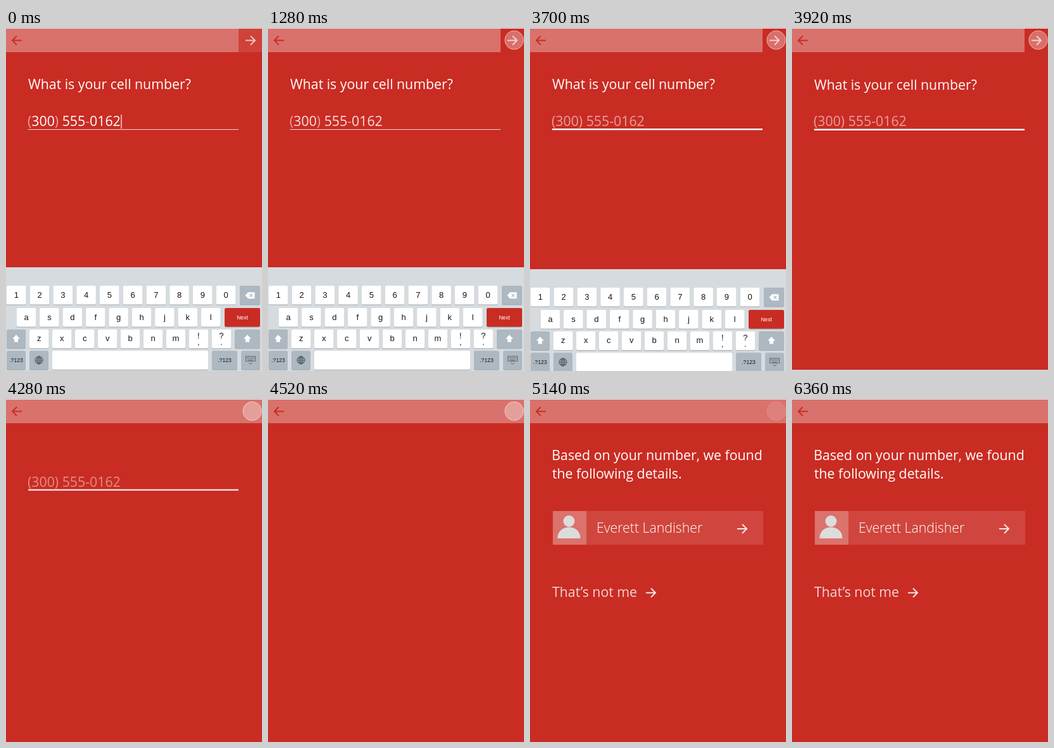
These frames come from a looping animation (404 px wide and 539 px high, 6.38 s). An HTML page:

```html
<!DOCTYPE html>
<html lang="en">
<head>
<meta charset="utf-8">
<title>Sign-up step</title>
<style>
  html, body { margin: 0; width: 100%; height: 100%; overflow: hidden; background: #c92c23; }
  svg { display: block; width: 100%; height: 100%; }
  text { white-space: pre; }
  .copy { font: 400 21.3px "Open Sans", sans-serif; fill: #fff; }
  .light { font-weight: 300; }
  .key { font: 13px "Liberation Sans", Arial, sans-serif; fill: #161616; text-anchor: middle; }
  .small { font-size: 8.6px; }
  .arrow { fill: none; stroke-width: 2; }
</style>
</head>
<body>
<svg viewBox="0 0 404 539" xmlns="http://www.w3.org/2000/svg">
  <defs>
    <path id="arrow" class="arrow" d="M0 0H15M8 -7L15 0L8 7"/>
  </defs>
  <rect width="404" height="539" fill="#c92c23"/>

  <g id="question">
    <text class="copy" x="35" y="96">What is your cell number?</text>
  </g>
  <g id="field">
    <text class="copy" x="34" y="154"><tspan fill-opacity=".55">(</tspan><tspan class="digits">300</tspan><tspan fill-opacity=".55">) </tspan><tspan class="digits">555</tspan><tspan fill-opacity=".55">-</tspan><tspan class="digits">0162</tspan></text>
    <rect id="caret" x="181.4" y="136" width="1.2" height="22" fill="#fff"/>
    <rect x="35" y="159" width="332" height="1" fill="#fff" fill-opacity=".8"/>
    <rect id="progress" x="35" y="158" width="0" height="2.4" fill="#fff"/>
  </g>

  <g id="answer">
    <text class="copy" x="34.3" y="96">Based on your number, we found</text>
    <text class="copy" x="35" y="125">the following details.</text>
  </g>
  <g id="card">
    <rect x="36" y="176" width="332" height="53" fill="#fff" fill-opacity=".12"/>
    <rect x="36" y="176" width="53" height="53" fill="#fff" fill-opacity=".24"/>
    <circle cx="61.5" cy="192" r="9" fill="#dcdcdc"/>
    <path d="M43.5 219C43.5 208 51 201.5 61.5 201.5S79.5 208 79.5 219Z" fill="#dcdcdc"/>
    <text class="copy light" x="105" y="210">Everett Landisher</text>
    <use href="#arrow" x="327" y="204" stroke="#fff" stroke-opacity=".85"/>
  </g>
  <g id="reject">
    <text class="copy" x="35" y="311" fill-opacity=".8">That’s not me</text>
    <use href="#arrow" x="183" y="304.5" stroke="#fff" stroke-opacity=".88"/>
  </g>

  <g id="keyboard"></g>

  <rect y="1" width="404" height="37" fill="#d9726c"/>
  <rect width="404" height="1" fill="#f0dedd"/>
  <use href="#arrow" transform="translate(25 19.5) scale(-1 1)" stroke="#c92c23"/>
  <g id="next">
    <rect x="367" y="1" width="37" height="37" fill="#c92c23"/>
    <rect id="glow" x="367" y="1" width="37" height="37" fill="#fff"/>
    <use href="#arrow" x="378" y="19.5" stroke="#fff" stroke-opacity=".68"/>
  </g>
  <circle id="touch" cx="388.5" cy="19" r="14.7" fill="#fff" fill-opacity=".32" stroke="#fff" stroke-opacity=".5"/>
</svg>
<script>
const LOOP = 6380;
const $ = id => document.getElementById(id);
const digits = document.querySelectorAll(".digits");

const part = (t, from, to) => Math.min(1, Math.max(0, (t - from) / (to - from)));
const sine = p => (1 - Math.cos(Math.PI * p)) / 2;
const inOutCubic = p => p < .5 ? 4 * p ** 3 : 1 - 4 * (1 - p) ** 3;
const pullBack = p => 1.6 * p ** 3 - .6 * p ** 2;

// Ease with control points (.4, 0) and (.2, 1), solved by bisection.
function standard(x) {
  let low = 0, high = 1;
  for (let i = 0; i < 24; i++) {
    const s = (low + high) / 2, r = 1 - s;
    if (1.2 * r * r * s + .6 * r * s * s + s ** 3 < x) low = s; else high = s;
  }
  return 3 * low * low - 2 * low ** 3;
}

function place(id, y, opacity) {
  $(id).setAttribute("transform", `translate(0 ${y.toFixed(3)})`);
  $(id).setAttribute("opacity", opacity);
}

function buildKeyboard() {
  const GREY = "#adb8c0", RED = "#c92c23";
  let out = '<rect y="376" width="404" height="163" fill="#d6dbdf"/>';

  const cap = (x, y, w, fill = "#fff") => {
    out += `<rect x="${x}" y="${y + 1}" width="${w}" height="29.5" rx="2.5" fill="#a2a9ae"/>` +
      `<rect x="${x}" y="${y}" width="${w}" height="29.5" rx="2.5" fill="${fill}"/>`;
  };
  const label = (x, y, s, extra = "") => {
    out += `<text class="key ${extra}" x="${x}" y="${y}">${s}</text>`;
  };
  const row = (keys, x, y, step) => [...keys].forEach((k, i) => {
    const left = x + i * step;
    cap(left, y, 30.6);
    label(left + 15.3, y + 18.5, k);
  });
  const shift = x => {
    out += `<path d="M${x} 482l6 6.5h-3v5h-6v-5h-3z" fill="#fff"/>`;
  };

  row("1234567890", 1, 405, 36.75);
  row("asdfghjkl", 16.7, 440, 36.4);
  row("zxcvbnm", 37, 473.7, 35.95);

  [["!", ",", 288.6], ["?", ".", 324.6]].forEach(([top, low, x]) => {
    cap(x, 473.7, 30.6);
    label(x + 15.3, 488, top);
    label(x + 15.3, 498, low);
  });

  cap(369, 405, 32, GREY);
  out += '<path d="M377.5 420.3l4.5-5h10.5v10H382z" fill="#fff"/>' +
    `<path d="M384.5 418l4.5 4.6m0-4.6l-4.5 4.6" stroke="${GREY}" stroke-width="1.2"/>`;
  cap(345, 440, 56, RED);
  out += '<text class="key small" x="373" y="457.5" style="fill:#fff">Next</text>';
  cap(1, 473.7, 30, GREY);
  shift(16);
  cap(361, 473.7, 40, GREY);
  shift(381);

  cap(1, 507.3, 30, GREY);
  label(16, 525, ".?123", "small");
  cap(37, 507.3, 30, GREY);
  out += '<g fill="none" stroke="#333a40" stroke-width=".8"><circle cx="52" cy="522" r="6"/>' +
    '<ellipse cx="52" cy="522" rx="2.8" ry="6"/>' +
    '<path d="M46 522h12M52 516v12M47.2 518.8h9.6M47.2 525.2h9.6"/></g>';
  cap(73, 507.3, 246);
  cap(325, 507.3, 40, GREY);
  label(345, 525, ".?123", "small");
  cap(371, 507.3, 30, GREY);
  out += '<g fill="none" stroke="#4a5258" stroke-width=".8"><rect x="378.5" y="516" width="15" height="7.5"/>' +
    '<path d="M380 518h12M380 520h12" stroke-dasharray="1.4 .8"/><path d="M382 522h8"/>' +
    '<path d="M383 526l3 2 3-2"/></g>';
  $("keyboard").innerHTML = out;
}

function draw(t) {
  // Tap on the forward arrow
  const press = part(t, 140, 320);
  $("touch").setAttribute("opacity", press * (1 - part(t, 5000, 5200)));
  $("glow").setAttribute("opacity", .1 * (1 - press));
  $("next").setAttribute("opacity", 1 - sine(part(t, 3960, 4220)));

  // Number dims while the line fills
  const dim = sine(part(t, 1160, 1480));
  digits.forEach(d => d.setAttribute("fill-opacity", 1 - .45 * dim));
  $("caret").setAttribute("opacity", 1 - part(t, 1140, 1240));
  $("progress").setAttribute("width", 332 * standard(part(t, 1300, 2940)));

  // First screen leaves
  place("keyboard", 163 * inOutCubic(part(t, 3648, 3966)), 1);
  place("question", -50 * pullBack(part(t, 3780, 4280)), 1 - sine(part(t, 3900, 4200)));
  place("field", -57 * pullBack(part(t, 3820, 4460)), 1 - sine(part(t, 4220, 4460)));

  // Second screen arrives
  [["answer", 4515], ["card", 4625], ["reject", 4755]].forEach(([id, start]) => {
    const p = sine(part(t, start, start + 300));
    place(id, 10 * (1 - p), p);
  });
}

buildKeyboard();
const begin = performance.now();
function tick() {
  draw((performance.now() - begin) % LOOP);
  requestAnimationFrame(tick);
}
draw(0);
requestAnimationFrame(tick);
</script>
</body>
</html>
```
